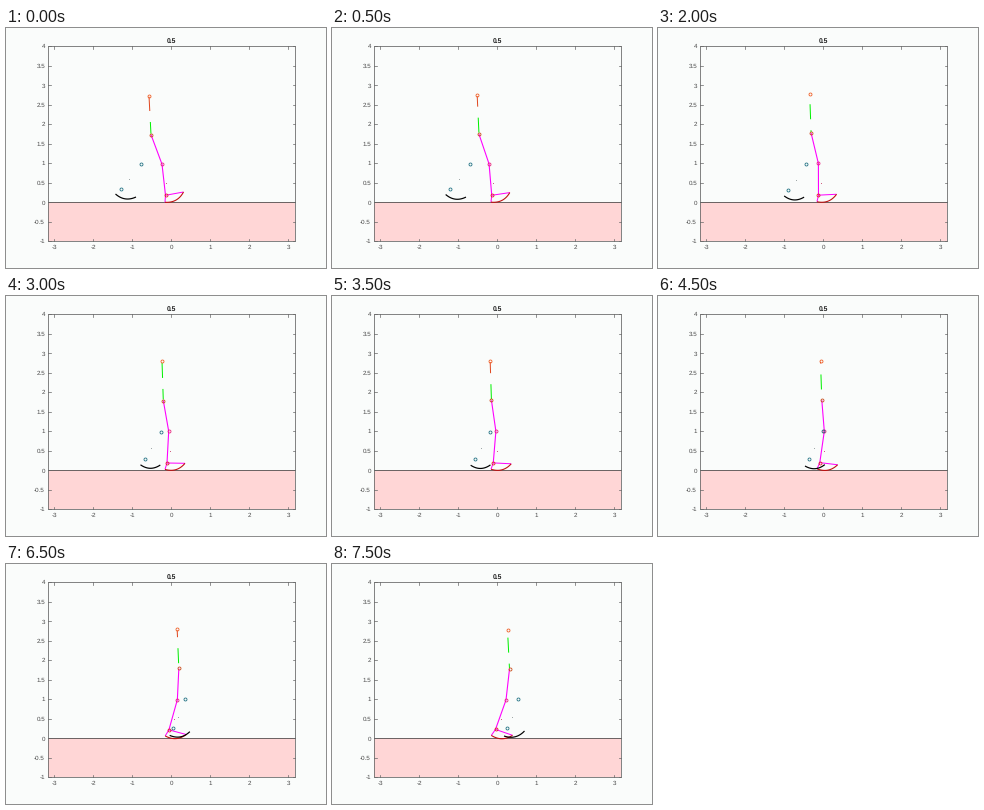
A matplotlib script for the animation above (8 s loop, 320 by 240 pixels).

```python
import numpy as np
import matplotlib.pyplot as plt
from matplotlib.animation import FuncAnimation
from matplotlib.patches import Rectangle

plt.rcParams["font.family"] = "Liberation Sans"
plt.rcParams["text.hinting"] = "none"
DPI = 100
PX = 72 / DPI
W, H = 320, 240
FRAMES, STEP = 16, 500
UNIT, X0, Y0 = 39, 165, 174
LEFT, RIGHT, TOP, BOTTOM = 42, 289, 18, 213
GREY, MAGENTA, RED = "#666666", "#ff00ff", "#e02020"
GREEN, TEAL = "#00f000", "#1c6e80"
DASH, PERIOD = 15, 26

fig = plt.figure(figsize=(W / DPI, H / DPI), dpi=DPI, facecolor="#fafcfb")
ax = fig.add_axes([0, 0, 1, 1])
ax.set_xlim(0, W)
ax.set_ylim(H, 0)
ax.axis("off")


def stroke(color, width=1.0, z=3):
    return ax.plot([], [], color=color, lw=width * PX, zorder=z,
                   solid_capstyle="butt")[0]


def ring(color):
    return ax.plot([], [], "o", ms=3 * PX, mfc="none", mec=color,
                   mew=0.8 * PX, zorder=5)[0]


def dot(color):
    return ax.plot([], [], "s", ms=1 * PX, color=color, mew=0, zorder=4)[0]


def draw_axes():
    ax.add_patch(Rectangle((LEFT, Y0), RIGHT - LEFT, BOTTOM - Y0,
                           fc="#ffd6d6", ec="none", zorder=1))
    ax.plot([LEFT, RIGHT], [Y0, Y0], color="#484848", lw=0.8 * PX, zorder=2)
    ax.add_patch(Rectangle((LEFT, TOP), RIGHT - LEFT, BOTTOM - TOP,
                           fc="none", ec=GREY, lw=0.8 * PX, zorder=2))
    tick = dict(color=GREY, lw=0.7 * PX, zorder=2)
    label = dict(fontsize=6.3 * PX, color="#484848")
    for v in range(-3, 4):
        x = X0 + v * UNIT
        ax.plot([x, x], [BOTTOM, BOTTOM - 2.5], **tick)
        ax.plot([x, x], [TOP, TOP + 2.5], **tick)
        ax.text(x + 0.5, 219.5, str(v), ha="center", va="center", **label)
    for v in np.arange(-1, 4.1, 0.5):
        y = Y0 - v * UNIT
        ax.plot([LEFT, LEFT + 2.5], [y, y], **tick)
        ax.plot([RIGHT, RIGHT - 2.5], [y, y], **tick)
        ax.text(39, y + 0.3, f"{v:g}", ha="right", va="center_baseline",
                **label)
    ax.text(X0 + 0.5, 12.8, "0.5", ha="center", va="center", weight="bold",
            fontsize=6.8 * PX, color="#202020")


# Positions at 0 s, 3 s and 7.5 s, joined by a parabola.
PATHS = {
    "head": ((143, 67.8), (156, 65.2), (175.5, 66)),
    "hip": ((145, 106.7), (157.3, 104.5), (177.5, 105)),
    "knee": ((156, 136.2), (162.7, 135.3), (174, 136)),
    "ankle": ((159.5, 167.3), (161, 167), (163.5, 165.4)),
    "heel": ((159, 174.3), (159, 173.4), (159.3, 171.4)),
    "toe": ((177.5, 164), (179, 167.3), (180.5, 171.3)),
    "knee2": ((134.5, 136.3), (154.5, 135.6), (186, 135)),
    "ankle2": ((114.5, 161), (138.5, 162.5), (175, 164.3)),
    "heel2": ((109.5, 166), (134.5, 168.8), (172, 172)),
    "toe2": ((130, 169), (154.3, 169), (192.5, 167)),
    "mass": ((160, 155), (164, 155), (169, 154.5)),
    "mass2": ((123, 151), (145, 152), (180, 153)),
}


def place(name, t):
    a, b, c = np.array(PATHS[name])
    return (a * (t - 3) * (t - 7.5) / 22.5
            + b * t * (t - 7.5) / -13.5
            + c * t * (t - 3) / 33.75)


def sole(heel, toe, sag=3.4):
    d = (toe - heel) / np.hypot(*(toe - heel))
    s = np.linspace(0, 1, 20)[:, None]
    return heel + (toe - heel) * s + np.array([-d[1], d[0]]) * 4 * sag * s * (1 - s)


def put(line, *points):
    line.set_data(*np.array(points).T)


draw_axes()
leg, foot = stroke(MAGENTA, 1.1), stroke(MAGENTA)
arc, arc2 = stroke("#c01010", 1.1), stroke("#000000", 1.2, 4)
dashes = [stroke(GREEN) for _ in range(3)]
rings = {"head": ring("#f05a20"), "hip": ring("#c84614"),
         "knee": ring("#e8207a"), "ankle": ring(RED),
         "knee2": ring(TEAL), "ankle2": ring(TEAL)}
dots = {"mass": dot("#d06080"), "mass2": dot("#a0a8a8")}


def trunk(t, head, hip):
    """Dashes that slide upwards; the one touching the head is red."""
    top, bottom = head[1] + 1, hip[1] - 1
    start = 68 - 8.6 * t - 0.14 * t * t
    start += PERIOD * np.ceil((top - DASH - start) / PERIOD)
    for k, line in enumerate(dashes):
        first = start + k * PERIOD
        ends = np.clip([first, first + DASH], top, bottom)
        f = (ends - head[1]) / (hip[1] - head[1])
        put(line, *(head + f[:, None] * (hip - head)))
        line.set_color("#e04820" if first < top else GREEN)


def update(i):
    t = i * STEP / 1000
    p = {name: place(name, t) for name in PATHS}
    put(leg, p["hip"], p["knee"], p["ankle"])
    put(foot, p["heel"], p["ankle"], p["toe"])
    put(arc, *sole(p["heel"], p["toe"]))
    put(arc2, *sole(p["heel2"], p["toe2"]))
    trunk(t, p["head"], p["hip"])
    for name, mark in {**rings, **dots}.items():
        put(mark, p[name])
    return []


anim = FuncAnimation(fig, update, frames=FRAMES, interval=STEP,
                     init_func=lambda: update(0), repeat=True,
                     repeat_delay=0, blit=False)
plt.show()
```
